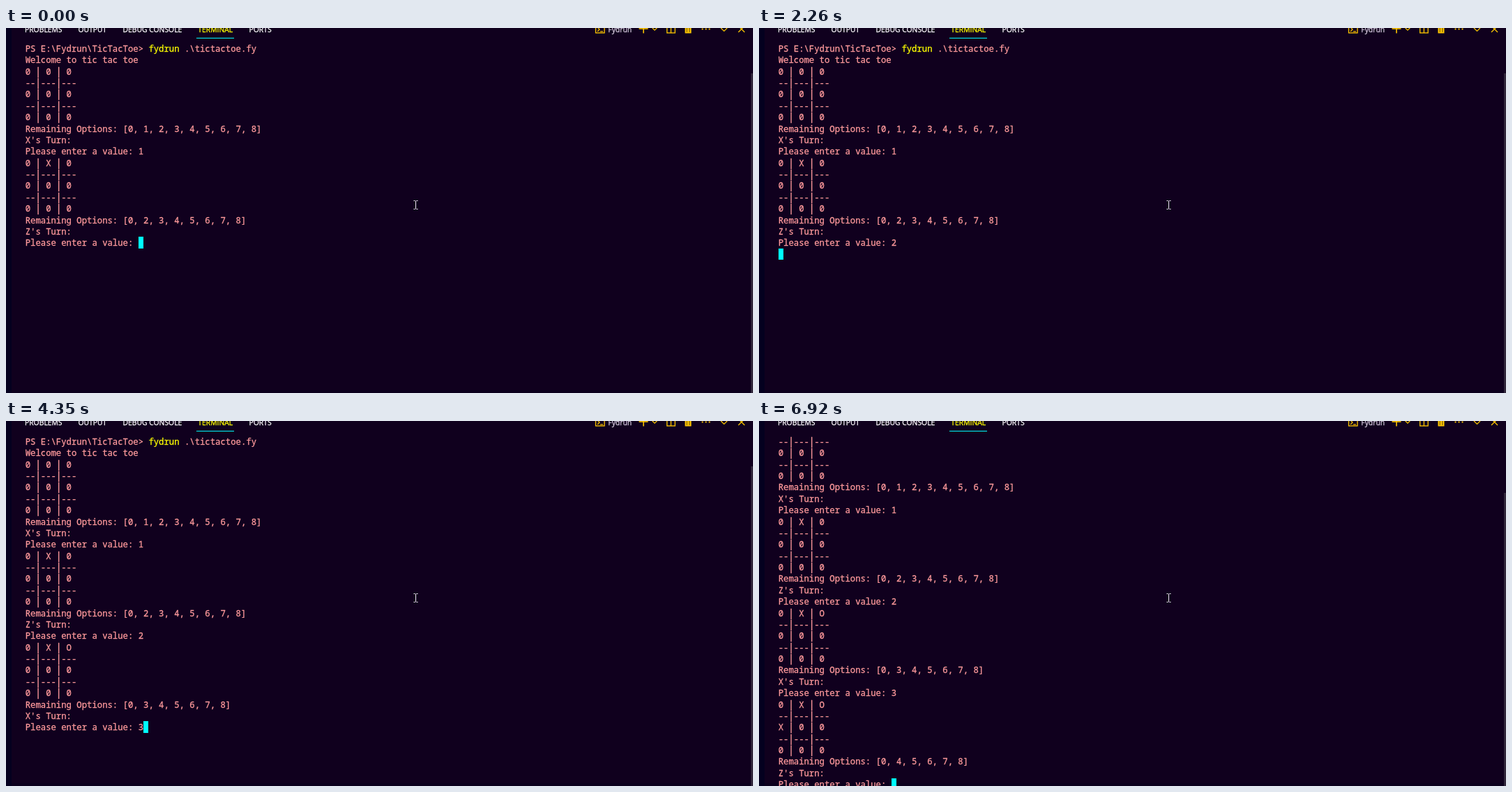
An HTML page with a canvas for the animation above (8000 ms loop, 1071 by 523 pixels).

```html
<!DOCTYPE html>
<html lang="en">
<head>
<meta charset="utf-8">
<title>Terminal game</title>
<style>
html, body { margin: 0; width: 100%; height: 100%; overflow: hidden; background: #10001e; }
canvas { display: block; }
</style>
</head>
<body>
<canvas id="stage" width="1071" height="523"></canvas>
<script>
const ctx = document.getElementById('stage').getContext('2d');
const W = 1071, H = 523, LOOP = 8000;
const LEFT = 27.7, TOP = 21.6, CELL = 7.362, ROW = 16.37, ROWS = 31;
const MONO = '12.27px "Noto Sans Mono", monospace';
const TALL = '14.5px "Noto Sans Mono", monospace';
const SANS = '10.35px "Open Sans", sans-serif';
const PINK = '#ff9a9c', YELLOW = '#ffff00', CYAN = '#00ffff', GOLD = '#ffc800', WHITE = '#ffffff';
const PATH = 'PS E:\\Fydrun\\TicTacToe> ', PROGRAM = 'fydrun', PROMPT = 'Please enter a value: ';

// When each player types, presses enter and gets a reply.
const PLAYS = [
  { type: 500, enter: 2260, reply: 2410 },
  { type: 4350, enter: 4740, reply: 4740 }
];
const lastReply = PLAYS[PLAYS.length - 1].reply;

function turn(n) {
  const cells = Array(9).fill('0');
  for (let i = 1; i <= n; i++) cells[i] = i % 2 ? 'X' : 'O';
  const rows = [0, 3, 6].map(i => cells.slice(i, i + 3).join(' | '));
  const left = [...cells.keys()].filter(i => i === 0 || i > n);
  return [
    rows[0], '--|---|---', rows[1], '--|---|---', rows[2],
    `Remaining Options: [${left.join(', ')}]`,
    (n % 2 ? 'Z' : 'X') + "'s Turn:", PROMPT
  ];
}

function buildLog(t) {
  const lines = [PATH + PROGRAM + ' .\\tictactoe.fy', 'Welcome to tic tac toe', ...turn(0)];
  lines[lines.length - 1] += 1;
  lines.push(...turn(1));
  PLAYS.forEach((play, i) => {
    if (t >= play.type) lines[lines.length - 1] += i + 2;
    if (t >= play.reply) lines.push(...turn(i + 2));
    else if (t >= play.enter) lines.push('');
  });
  return lines;
}

function box(x, y, w, h, color) {
  ctx.fillStyle = color;
  ctx.fillRect(x, y, w, h);
}

// The thin outline gives the slightly heavier weight of screen text.
function label(text, x, y, color) {
  ctx.fillStyle = ctx.strokeStyle = color;
  ctx.lineWidth = 0.3;
  ctx.fillText(text, x, y);
  ctx.strokeText(text, x, y);
}

function line(color, width, ...points) {
  ctx.strokeStyle = color;
  ctx.lineWidth = width;
  ctx.beginPath();
  points.forEach(([x, y]) => ctx.lineTo(x, y));
  ctx.stroke();
}

function chevron(x, y, r) {
  line(GOLD, 1.2, [x - r, y - r], [x, y], [x + r, y - r]);
}

function panel(x, w) {
  ctx.strokeStyle = GOLD;
  ctx.lineWidth = 1.3;
  ctx.strokeRect(x, -5, w, 12);
}

function drawTabs() {
  ctx.font = SANS;
  ctx.textAlign = 'left';
  label('PROBLEMS', 27, 6.3, WHITE);
  label('OUTPUT', 103.5, 6.3, WHITE);
  label('DEBUG CONSOLE', 167.5, 6.3, WHITE);
  label('TERMINAL', 275.3, 6.3, YELLOW);
  label('PORTS', 348.5, 6.3, WHITE);
  box(273, 14, 54, 1, CYAN);
  label(PROGRAM[0].toUpperCase() + PROGRAM.slice(1), 863.3, 6.3, '#d3c9dc');
}

function drawIcons() {
  // shell
  panel(845.5, 12.5);
  line(GOLD, 1.2, [848, -1], [851, 2], [848, 5]);
  line(GOLD, 1.2, [852, 5], [856, 5]);
  // add, with menu
  line(GOLD, 1.6, [907.5, 1], [920.5, 1]);
  line(GOLD, 1.6, [914, -5], [914, 7.5]);
  chevron(930, 3.2, 3.4);
  // split
  panel(947.7, 11.5);
  line(GOLD, 1.3, [953.4, -5], [953.4, 7]);
  // bin
  box(972.5, -2, 11, 1.4, GOLD);
  box(973.5, -1, 9, 8.5, GOLD);
  for (const x of [975.7, 979.3]) box(x, 0, 1, 6, '#5a4010');
  // more
  for (let i = 0; i < 3; i++) box(997.6 + i * 5, 0.6, 1.9, 1.9, GOLD);
  // hide and close
  chevron(1029.5, 4.5, 4.5);
  for (const s of [-1, 1]) line(GOLD, 1.3, [1054.5 - 4.5 * s, -3], [1054.5 + 4.5 * s, 6]);
}

function drawLog(lines, first) {
  ctx.textAlign = 'center';
  lines.slice(first).forEach((text, r) => {
    [...text].forEach((ch, c) => {
      const lit = first + r === 0 && c >= PATH.length && c < PATH.length + PROGRAM.length;
      ctx.font = ch === '|' ? TALL : MONO;
      label(ch, LEFT + (c + 0.5) * CELL, TOP + r * ROW + 12.4, lit ? YELLOW : PINK);
    });
  });
}

function drawCursor(row, col) {
  const x = Math.round(LEFT + col * CELL);
  const y = Math.floor(TOP + row * ROW);
  box(x, y, 7, Math.floor(TOP + (row + 1) * ROW) - y, CYAN);
}

function drawScrollbar(t, hidden) {
  const settle = Math.min(1, Math.max(0, (t - lastReply) / 2180));
  const y = Math.floor(65 + hidden * 37 / 3 + settle);
  box(1068, y, 3, H - y, '#32283c');
}

function drawPointer(x, y) {
  line('#f0ecf4', 1, [x, y - 6], [x, y + 6]);
  for (const s of [-1, 1])
    for (const end of [-6, 6]) line('#f0ecf4', 1, [x + s, y + end], [x + 3 * s, y + end]);
}

function draw(t) {
  const lines = buildLog(t);
  const last = lines.length - 1;
  const first = Math.max(0, lines.length - ROWS);
  box(0, 0, W, H, '#10001e');
  box(0, 0, 8, H, '#04001f');
  box(8, 519, W - 8, 4, '#0b001d');
  drawTabs();
  drawIcons();
  drawLog(lines, first);
  drawCursor(last - first, lines[last].length);
  drawScrollbar(t, first);
  drawPointer(587.5, 253.5);
}

const start = performance.now();
function frame() {
  draw((performance.now() - start) % LOOP);
  requestAnimationFrame(frame);
}
frame();
</script>
</body>
</html>
```
